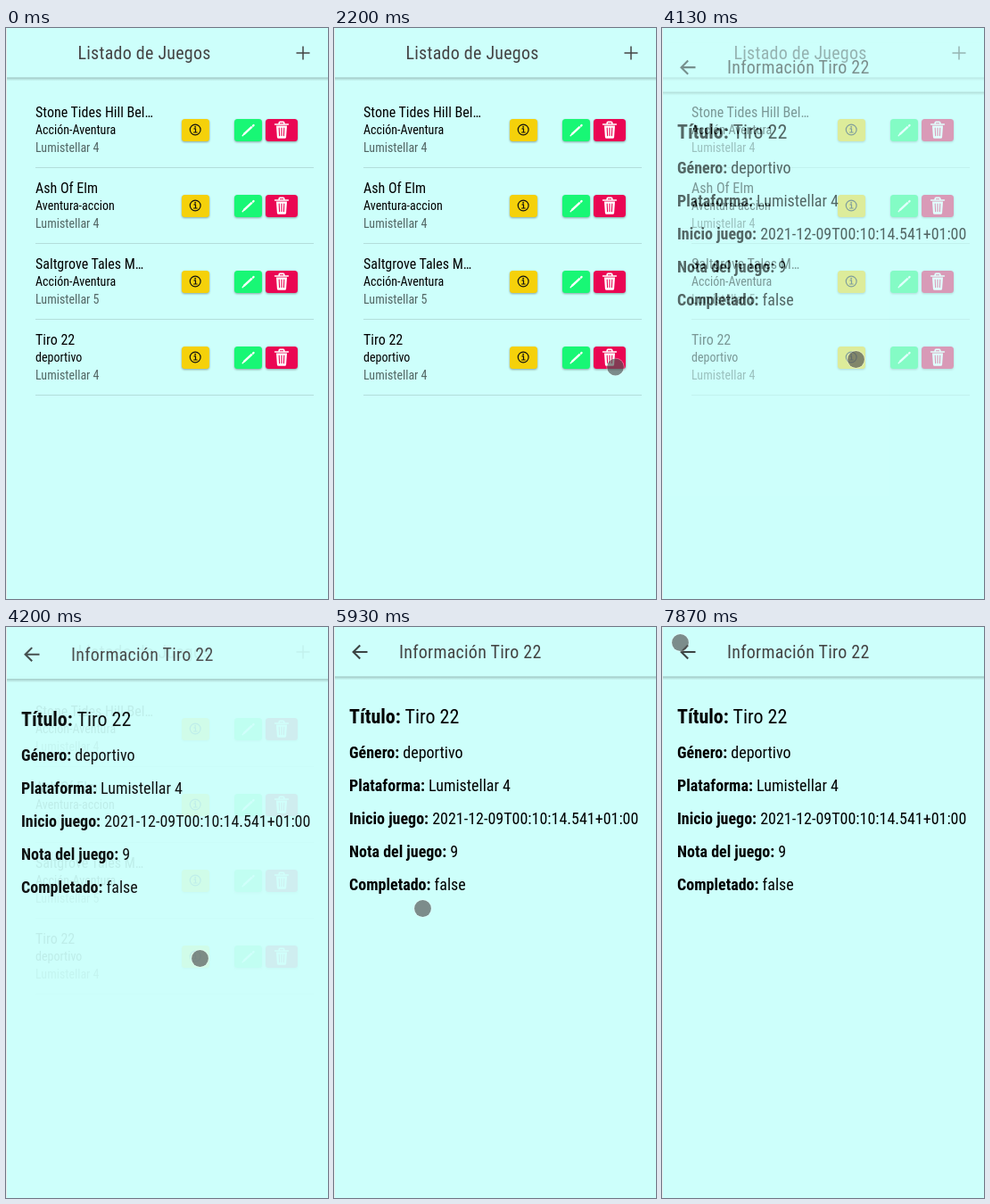
Recreate the animation shown at these times as an HTML page. Size 361 px wide and 640 px high, loop 8000 ms.

```html
<!DOCTYPE html>
<html lang="es">
<head>
<meta charset="utf-8">
<title>Listado de Juegos</title>
<style>
  html, body { margin: 0; width: 100%; height: 100%; overflow: hidden; background: #cdfffb; }
  svg { display: block; width: 100%; height: 100%; }
  text { font-family: "Roboto Condensed", Roboto, "Liberation Sans Narrow", sans-serif; font-stretch: 75%; }
  .title { font-size: 20px; letter-spacing: .0125em; fill: #444; }
  .name { font-size: 16px; }
  .genre, .platform { font-size: 14px; }
  .platform { fill: #000; fill-opacity: .6; }
  .field { font-size: 18px; }
  .lead { font-size: 22px; }
  .button { filter: drop-shadow(0 1px 1.2px rgba(0, 0, 0, .35)); }
  .line { fill: none; stroke-linecap: round; stroke-linejoin: round; }
</style>
</head>
<body>
<svg viewBox="0 0 361 640" preserveAspectRatio="none">
  <defs>
    <linearGradient id="shade" x2="0" y2="1">
      <stop offset="0" stop-opacity=".26"/>
      <stop offset=".4" stop-opacity=".12"/>
      <stop offset="1" stop-opacity="0"/>
    </linearGradient>
    <g id="page">
      <rect width="361" height="640" fill="#cdfffb"/>
      <rect y="55.5" width="361" height="4" fill="url(#shade)"/>
    </g>
    <g id="actions">
      <rect class="button" x="197" y="102" width="31" height="25" rx="3.5" fill="#f5d10a"/>
      <rect class="button" x="256" y="102" width="31" height="25" rx="3.5" fill="#18f775"/>
      <rect class="button" x="291" y="102" width="36" height="25" rx="3.5" fill="#ea0653"/>
      <g class="line" stroke="#111" stroke-width="1.2">
        <circle cx="212.2" cy="114" r="5.9"/>
        <path d="M211 112.9h1.5v4M210.6 117h3.6"/>
        <circle cx="212.2" cy="110.8" r=".35"/>
      </g>
      <g class="line" stroke="#fff">
        <path d="M266.6 119.2L275.8 110.7" stroke-width="2.5" stroke-linecap="butt"/>
        <path d="M277 109.6l.6-.6" stroke-width="2.3"/>
        <path d="M265.2 120.7l1.3-1.5" stroke-width="1.4"/>
      </g>
      <path d="M303 109.5h12l-.9 12.7q-.1 1.6-1.6 1.6h-7q-1.5 0-1.6-1.6z" fill="#fff"/>
      <path class="line" d="M301.6 108h14.8M306.2 107.6v-1.2q0-1 1-1h3.6q1 0 1 1v1.2" stroke="#fff" stroke-width="1.6"/>
      <path class="line" d="M306.2 112l.4 8.6M309 112v8.6M311.8 112l-.4 8.6" stroke="#ea0653" stroke-width="1.1"/>
    </g>
  </defs>

  <g id="list">
    <use href="#page"/>
    <text class="title" x="80.5" y="35">Listado de Juegos</text>
    <path d="M325.5 28h15M333 20.5v15" stroke="#444" stroke-width="1.5"/>
  </g>
  <g id="detail">
    <use href="#page"/>
    <path d="M37.5 28H22.5M29.2 20.4L21.6 28l7.6 7.6" fill="none" stroke="#3c4443" stroke-width="2.1"/>
    <text class="title" x="73" y="35">Información Tiro 22</text>
  </g>
  <rect width="1" height="640" fill="#e6eeed"/>
  <g id="pointer">
    <circle r="10.2" fill="#fff" fill-opacity=".4"/>
    <circle r="9.4" fill-opacity=".45"/>
  </g>
</svg>
<script>
  const LOOP = 8000;
  const $ = id => document.getElementById(id);
  const add = (id, markup) => $(id).insertAdjacentHTML('beforeend', markup);

  const games = [
    ['Stone Tides Hill Bel…', 'Acción-Aventura', 'Lumistellar 4'],
    ['Ash Of Elm', 'Aventura-accion', 'Lumistellar 4'],
    ['Saltgrove Tales M…', 'Acción-Aventura', 'Lumistellar 5'],
    ['Tiro 22', 'deportivo', 'Lumistellar 4']
  ];
  games.forEach(([name, genre, platform], i) => add('list', `
    <g transform="translate(0 ${i * 85})">
      <text class="name" x="33" y="100">${name}</text>
      <text class="genre" x="33" y="119">${genre}</text>
      <text class="platform" x="33" y="139">${platform}</text>
      <use href="#actions"/>
      <rect x="33" y="156" width="312" height="1" fill-opacity=".13"/>
    </g>`));

  const fields = [
    ['Título', 'Tiro 22'],
    ['Género', 'deportivo'],
    ['Plataforma', 'Lumistellar 4'],
    ['Inicio juego', '2021-12-09T00:10:14.541+01:00'],
    ['Nota del juego', '9'],
    ['Completado', 'false']
  ];
  fields.forEach(([label, value], i) => add('detail',
    `<text class="${i ? 'field' : 'lead'}" x="17" y="${i ? 110 + i * 37 : 108}"><tspan font-weight="700">${label}:</tspan> ${value}</text>`));

  // Pointer moves: first step, last step, number of steps, destination
  const moves = [
    [1200, 1200, 1, 290, 120],
    [1300, 1600, 4, 335, 489],
    [1700, 2000, 4, 309, 409],
    [2100, 2200, 2, 315.5, 380],
    [2530, 2600, 2, 317, 374],
    [3030, 3330, 4, 227, 372],
    [3500, 3500, 1, 217.5, 371.5],
    [5370, 5930, 7, 99.5, 315.5],
    [6030, 6130, 2, 90, 317],
    [6330, 6330, 1, 88, 317.5],
    [6500, 6630, 3, 82.5, 317],
    [7270, 7870, 7, 20.5, 17.5]
  ];

  function pointerAt(t) {
    let x = 290, y = 120;
    for (const [from, to, count, endX, endY] of moves) {
      if (t < from) break;
      const step = count > 1 ? Math.floor((t - from) / (to - from) * (count - 1) + .001) : 0;
      const p = Math.min(1, (step + 1) / count);
      x += (endX - x) * p;
      y += (endY - y) * p;
    }
    return [x, y];
  }

  const timing = { duration: 270, delay: 4072, fill: 'both', easing: 'cubic-bezier(.36,.66,.04,1)' };
  const entry = $('detail').animate([
    { transform: 'translateY(40px)', opacity: 0 },
    { transform: 'translateY(0)', opacity: 1 }
  ], timing);
  entry.pause();

  function draw(now) {
    const t = now % LOOP;
    entry.currentTime = t;
    $('pointer').setAttribute('transform', `translate(${pointerAt(t)})`);
    $('pointer').setAttribute('visibility', t < 1200 ? 'hidden' : 'visible');
  }

  const start = performance.now();
  function tick() {
    draw(performance.now() - start);
    requestAnimationFrame(tick);
  }
  tick();
</script>
</body>
</html>
```
